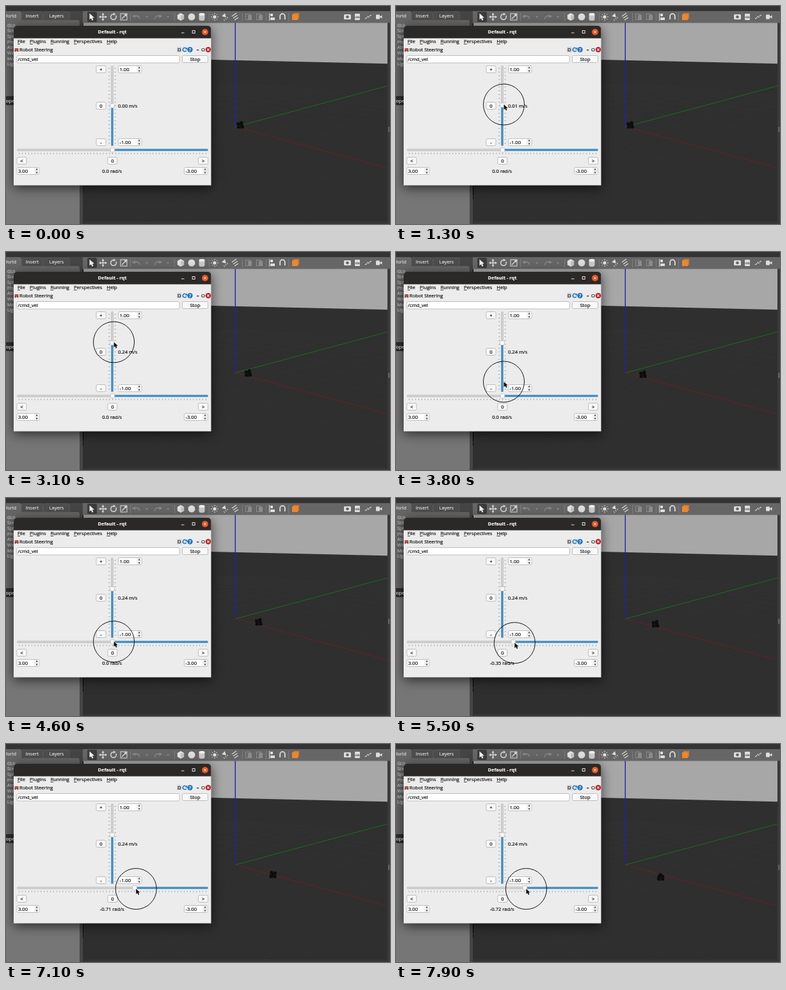
Animation, 600 px wide and 341 px high, one loop 8 s. Source, as an HTML page with a canvas:

```html
<!DOCTYPE html>
<html lang="en">
<head>
<meta charset="utf-8">
<title>Robot steering</title>
<style>
  html, body { margin: 0; width: 100%; height: 100%; overflow: hidden; background: #2f2f2f; }
  canvas { display: block; width: 600px; height: 341px; }
</style>
</head>
<body>
<canvas id="stage" width="600" height="341"></canvas>
<script>
const ctx = document.getElementById('stage').getContext('2d');
const LOOP = 8000, STEP = 100, TAU = Math.PI * 2;
const FONT = '"Open Sans", "Noto Sans", sans-serif';
const BLUE = '#3b8dc8', INK = '#161616', PALE = '#dedede', DIM = '#8b8b8b';

// --- Motion ---
const ramp = (t, from, to) => Math.min(1, Math.max(0, (t - from) / (to - from)));
const smooth = (t, from, to) => { const p = ramp(t, from, to); return p * p * (3 - 2 * p); };
const easeOut = (t, from, to) => Math.sin(ramp(t, from, to) * Math.PI / 2);

const speedAt = t => 0.22 * smooth(t, 1200, 1900) + 0.02 * ramp(t, 2000, 2300);
const turnAt = t => -0.72 * easeOut(t, 4650, 7300);
const knobYAt = t => 156 - speedAt(t) * 57.5;

function pointerAt(t) {
  const entry = 1 - easeOut(t, 300, 600), down = smooth(t, 3200, 4100);
  return {
    x: 168.5 + 21 * entry - turnAt(t) * 48.5,
    y: knobYAt(t) - 1.2 + 105 * entry + 83.6 * down + 2 * ramp(t, 4650, 5200)
  };
}

// The robot follows the sliders with a short delay.
function robotAt(t) {
  const LAG = 300, dt = STEP / 1000;
  let a = 0.186, b = 0, heading = 0;
  for (let s = STEP; s <= t; s += STEP) {
    const command = s - LAG - STEP / 2;
    heading += turnAt(command) * dt;
    a += speedAt(command) * Math.cos(heading) * dt;
    b += speedAt(command) * Math.sin(heading) * dt;
  }
  return { a, b, heading };
}

// --- Drawing helpers ---
function rect(x, y, w, h, color) {
  ctx.fillStyle = color;
  ctx.fillRect(x, y, w, h);
}

function frameRect(x, y, w, h, color) {
  ctx.strokeStyle = color;
  ctx.lineWidth = 1;
  ctx.strokeRect(x, y, w, h);
}

function rounded(x, y, w, h, r, fill, stroke) {
  ctx.beginPath();
  ctx.roundRect(x, y, w, h, r);
  if (fill) { ctx.fillStyle = fill; ctx.fill(); }
  if (stroke) { ctx.strokeStyle = stroke; ctx.lineWidth = 0.8; ctx.stroke(); }
}

function disc(x, y, r, color, ry = r) {
  ctx.fillStyle = color;
  ctx.beginPath();
  ctx.ellipse(x, y, r, ry, 0, 0, TAU);
  ctx.fill();
}

function ring(x, y, r, color, width = 1, from = 0, to = TAU) {
  ctx.strokeStyle = color;
  ctx.lineWidth = width;
  ctx.beginPath();
  ctx.arc(x, y, r, from, to);
  ctx.stroke();
}

function line(color, width, x1, y1, x2, y2) {
  ctx.strokeStyle = color;
  ctx.lineWidth = width;
  ctx.beginPath();
  ctx.moveTo(x1, y1);
  ctx.lineTo(x2, y2);
  ctx.stroke();
}

function polygon(x, y, r, sides, angle, color) {
  ctx.fillStyle = color;
  ctx.beginPath();
  for (let i = 0; i < sides; i++) {
    const k = angle + i * TAU / sides;
    ctx.lineTo(x + r * Math.cos(k), y + r * Math.sin(k));
  }
  ctx.fill();
}

const triangle = (x, y, r, angle, color) => polygon(x, y, r, 3, angle, color);

function cross(x, y, r, color, width) {
  line(color, width, x - r, y - r, x + r, y + r);
  line(color, width, x + r, y - r, x - r, y + r);
}

function arrow(x, y, scale, fill, edge) {
  ctx.save();
  ctx.translate(x, y);
  ctx.scale(scale, scale);
  const path = new Path2D('M0 0V8.2L2 6.5 3.4 9.4 5 8.6 3.7 5.9 6.2 5.6Z');
  if (edge) { ctx.strokeStyle = edge; ctx.lineWidth = 1; ctx.stroke(path); }
  ctx.fillStyle = fill;
  ctx.fill(path);
  ctx.restore();
}

// A hairline outline gives the small type its stem weight.
function text(s, x, y, { color = INK, size = 7.6, align = 'left', weight = 400 } = {}) {
  ctx.font = `${weight} ${size}px ${FONT}`;
  ctx.textAlign = align;
  ctx.fillStyle = ctx.strokeStyle = color;
  ctx.lineWidth = 0.22;
  ctx.fillText(s, x, y);
  ctx.strokeText(s, x, y);
}

// --- Scene: a runs along the red axis, b along the green one ---
function project(a, b) {
  const A = -0.11 * a, B = 0.11 * b, d = 1 + A + B;
  return [(358.8 + B * 735) / d, (189 + A * 91.6 + B * 88) / d];
}

function drawScene(t) {
  rect(121, 26, 475, 315, '#2f2f2f');
  ctx.fillStyle = '#a7a7a7';
  ctx.fill(new Path2D('M121 26H596V90.2L320 84 121 79.5Z'));
  for (let i = -10; i <= 10; i++) {
    line('#353535', 0.6, ...project(-10, i), ...project(Math.min(10, i + 8), i));
    line('#353535', 0.6, ...project(i, Math.max(-10, i - 8)), ...project(i, 10));
  }
  line('#1d6a1d', 1, 358.5, 189, 596, 125);
  line('#6c1f1f', 1, 358.5, 189, 596, 253.3);
  line('#2222b4', 1.4, 358.3, 26, 358.3, 189);

  const { a, b, heading } = robotAt(t), [x, y] = project(a, b);
  ctx.save();
  ctx.translate(x, y - 5.3);
  disc(0, 1.5, 5.2, '#141414', 4.5);
  for (let i = 0; i < 3; i++) {
    const k = Math.PI - heading + i * TAU / 3;
    disc(3.5 * Math.cos(k), -1.5 + 2 * Math.sin(k), 2.5, '#0d0d0d');
  }
  for (const side of [-1, 1]) disc(side * 3.6, 4, 2, '#0a0a0a');
  ctx.restore();
  rect(121, 337, 475, 4, '#353535');
  rect(596, 26, 4, 315, '#393939');
  rect(597.5, 189, 1.5, 8, '#757575');
}

function drawToolbar() {
  const y = 17;
  rect(0, 0, 600, 8, '#343434');
  rect(120, 8, 480, 18.5, '#666666');
  rounded(127, 9, 15, 16, 2, '#3c3c3c');
  arrow(130.5, 11.5, 1.2, '#f2f2f2');

  for (let i = 0; i < 4; i++) {
    const k = i * TAU / 4, c = Math.cos(k), s = Math.sin(k);
    line(PALE, 1.3, 151.5, y, 151.5 + 4 * c, y + 4 * s);
    triangle(151.5 + 4.3 * c, y + 4.3 * s, 2.3, k, PALE);
  }
  ring(168, y, 4.3, PALE, 1.4, -0.5, 4.6);
  triangle(169, y - 4.3, 2.5, 0, PALE);
  frameRect(179, y - 5, 10, 10, PALE);
  line(PALE, 1.2, 181, y + 3, 188, y - 4);
  triangle(187, y - 3, 2.5, -TAU / 8, PALE);

  for (const [x, dir] of [[204, 1], [237, -1]]) {
    ring(x, y + 3, 4.5, DIM, 1.4, dir > 0 ? 4 : 3, dir > 0 ? 6.3 : 5.4);
    triangle(x - 4 * dir, y - 1, 3, dir > 0 ? Math.PI : 0, DIM);
    triangle(x + 16, y, 2, TAU / 4, DIM);
  }

  polygon(273, y, 6, 6, TAU / 12, '#e2e2e2');
  rect(273, y - 2.5, 5, 6, '#c2c2c2');
  disc(290, y, 5.5, '#dddddd');
  rounded(301.5, y - 6, 9, 12, 3, '#cacaca');
  disc(306, y - 4, 4.5, '#eeeeee', 2);

  disc(326, y, 2.6, PALE);
  for (let i = 0; i < 8; i++) {
    const c = Math.cos(i * TAU / 8), s = Math.sin(i * TAU / 8);
    line(PALE, 1, 326 + 4 * c, y + 4 * s, 326 + 6 * c, y + 6 * s);
  }
  triangle(341, y - 2, 4, TAU / 8, PALE);
  for (let i = 0; i < 3; i++) {
    line(PALE, 1, 340 + i * 2.5, y + 4 - i * 2, 342 + i * 2.5, y + 6 - i * 2);
    line(PALE, 1.1, 353 + i * 2, y - 1 + i * 3, 360 + i * 1.5, y - 6 + i * 3.5);
  }

  for (const x of [379, 396]) {
    frameRect(x - 4.5, y - 4.5, 7, 9, DIM);
    rect(x - 1, y - 3, 6, 8, DIM);
  }
  rect(411, y - 6, 1, 12, PALE);
  rect(413, y - 5, 4, 4, PALE);
  rect(413, y + 1, 7, 4, PALE);
  ring(432, y - 1, 3.8, PALE, 1.8, Math.PI, 0);
  for (const side of [-1, 1]) line(PALE, 1.8, 432 + side * 3.8, y - 1, 432 + side * 3.8, y + 4);
  rect(449, y - 6, 9, 9, '#cf7a30');
  rect(447, y - 4, 9, 9, '#f0862a');
  for (const x of [194, 263, 317, 369, 406, 441]) rect(x, y - 6, 1, 13, '#7d7d7d');

  rounded(528, y - 4, 11, 8, 1.5, PALE);
  disc(533.5, y, 2.3, '#666');
  rounded(545, y - 5, 8, 10, 1, PALE);
  text('LOG', 549, y + 2, { color: '#555', size: 3.5, align: 'center' });
  for (let i = 0; i < 3; i++) {
    line(PALE, 1.1, 561 + i * 3.3, y + 3 - i * 2 - i % 2 * 2, 564.3 + i * 3.3, y + 1 - i * 2 + i % 2 * 2);
  }
  rounded(578, y - 3.5, 6, 7, 1, PALE);
  triangle(586, y, 3, Math.PI, PALE);
}

function drawSidePanel() {
  const label = { color: '#d8d8d8' };
  rect(0, 8, 120, 333, '#454545');
  rounded(-5, 22, 120, 119, 3, '#666666');
  rect(0, 141, 115, 14, '#2e2e2e');
  rect(0, 155, 115, 186, '#767676');
  rounded(-10, 8, 34, 16, 3, '#666666');
  for (const [s, x, w] of [['Insert', 24.5, 33], ['Layers', 58.5, 41]]) {
    rounded(x, 9, w, 13, [3, 3, 0, 0], '#4d4d4d', '#5a5a5a');
    text(s, x + w / 2, 18, { ...label, align: 'center' });
  }
  text('World', -5, 18, label);
  ['GUI', 'Scene', 'Spherical', 'Physics', 'Atmosphere', 'Wind', 'Models', 'Lights']
    .forEach((s, i) => text(s, 2, 32.5 + i * 8.7, { color: '#c0c0c0', size: 7 }));
  text('Property', -7.5, 151, { color: '#e8e8e8' });
}

// --- Steering window ---
function button(label, x, y, w = 16) {
  rounded(x + 0.5, y + 0.5, w - 1, 11, 2, '#f8f8f8', '#b0b0b0');
  text(label, x + w / 2, y + 8.8, { align: 'center' });
}

function spinBox(value, x, y, w = 37.5) {
  rounded(x + 0.5, y + 0.5, w - 1, 11, 2, '#fff', '#b0b0b0');
  rect(x + w - 8.5, y + 1, 7.5, 10, '#f0f0f0');
  for (const side of [-1, 1]) triangle(x + w - 4.4, y + 6 + side * 2.4, 1.8, side * TAU / 4, '#444');
  text(value, x + 2.5, y + 8.8);
}

function knob(x, y) {
  rounded(x - 3.3, y - 3.3, 6.6, 6.6, 1.5, '#fcfcfc', '#b9b9b9');
}

function drawWindow() {
  ctx.save();
  ctx.shadowColor = 'rgba(0,0,0,.65)';
  ctx.shadowBlur = 18;
  ctx.shadowOffsetY = 4;
  rounded(12, 31, 308.5, 249.5, [5, 5, 0, 0], '#ececec');
  ctx.restore();
  rounded(12, 31, 308.5, 19.5, [5, 5, 0, 0], '#2b2927');
  text('Default - rqt', 166, 43.4, { color: '#f0f0ef', align: 'center', weight: 700, size: 7.4 });
  rect(274, 41.5, 4.5, 1, '#e4e4e4');
  frameRect(291.2, 38.5, 4, 4, '#e4e4e4');
  disc(311, 40.7, 5, '#e65524');
  cross(311, 40.7, 1.8, '#fff', 0.9);

  let x = 18;
  for (const s of ['File', 'Plugins', 'Running', 'Perspectives', 'Help']) {
    text(s, x, 58);
    rect(x, 59.2, ctx.measureText(s[0]).width, 0.8, INK);
    x += ctx.measureText(s).width + 7;
  }

  rounded(13.5, 66, 6, 4.5, 1, '#b3534a');
  for (const wheel of [14.5, 18.5]) disc(wheel, 70.5, 1, '#333');
  text('Robot Steering', 21, 71.3);
  rounded(267, 64, 7.5, 8.5, 1, '#d2d2d2');
  text('D', 270.8, 71.2, { align: 'center' });
  ring(279.3, 68.2, 2.9, '#2f83c5', 1.7, 0.5, 5.4);
  triangle(282, 66.8, 2.3, TAU / 8, '#2f83c5');
  disc(287.5, 68.3, 4.2, '#2977b7');
  text('?', 287.5, 71, { color: '#fff', align: 'center', size: 7 });
  rect(298, 68.3, 3.3, 1.2, INK);
  text('O', 308, 71.3, { align: 'center' });
  disc(316, 68.3, 4.2, '#c51f25');
  cross(316, 68.3, 1.6, '#fff', 1.1);
  rounded(17, 77.5, 254, 11.5, 2, '#fff', '#b0b0b0');
  text('/cmd_vel', 18.5, 86);
  button('Stop', 275, 77, 41);
}

function drawControls(t) {
  const turn = turnAt(t), knobY = knobYAt(t), knobX = 166.5 - turn * 48.5;

  rounded(164.5, 93.5, 2.9, 125, 1.2, '#d2d2d2', '#bdbdbd');
  rect(164.4, knobY, 3.1, 218.5 - knobY, BLUE);
  for (let i = 0; i <= 20; i++) {
    for (const x of [160.3, 169.7]) rect(x, 97 + i * 5.87, 1.8, 0.8, '#808080');
  }
  knob(166, knobY);
  ['+', '0', '-'].forEach((s, i) => button(s, 140.5, 93 + i * 57));
  spinBox('1.00', 175, 93);
  spinBox('-1.00', 175, 207);
  text(`${speedAt(t).toFixed(2)} m/s`, 175, 158.8);

  rounded(17.3, 223.8, 298, 2.7, 1.2, '#d2d2d2', '#bdbdbd');
  rect(knobX, 223.6, 315.5 - knobX, 3, BLUE);
  for (let i = 0; i <= 60; i++) rect(20.4 + i * 4.86, 229.8, 0.8, 1.8, '#808080');
  knob(knobX, 225.1);
  ['<', '0', '>'].forEach((s, i) => button(s, 16.5 + i * 141.8, 236));
  spinBox('3.00', 16.5, 252, 36);
  spinBox('-3.00', 278, 252);
  text(`${turn ? turn.toFixed(2) : '0.0'} rad/s`, 165.7, 260.8, { align: 'center' });
}

function drawPointer(t) {
  if (t < 300) return;
  const { x, y } = pointerAt(t);
  ring(x, y, 32, '#111', 1);
  arrow(x, y, 1, '#111', '#fff');
}

function draw(t) {
  drawScene(t);
  drawSidePanel();
  drawToolbar();
  drawWindow();
  drawControls(t);
  drawPointer(t);
}

const start = performance.now();
function frame() {
  const t = (performance.now() - start) % LOOP;
  draw(Math.floor(t / STEP) * STEP);
  requestAnimationFrame(frame);
}
frame();
</script>
</body>
</html>
```
